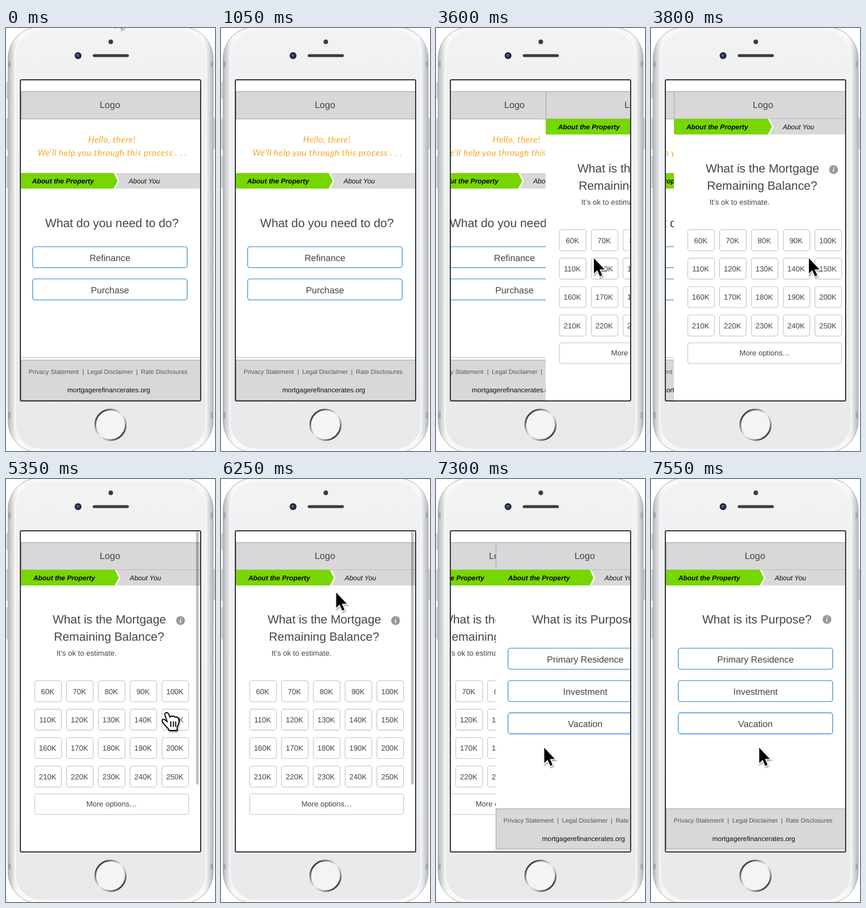
These frames come from a looping animation (364 by 735 pixels, 8000 ms). An HTML page:

```html
<!DOCTYPE html>
<html lang="en">
<head>
<meta charset="utf-8">
<title>Mortgage form prototype</title>
<style>
  html, body { margin: 0; width: 100%; height: 100%; overflow: hidden; background: #fff; }
  svg { display: block; width: 364px; height: 735px; }
  text { font-family: "Liberation Sans", Arial, sans-serif; fill: #444; text-rendering: geometricPrecision; }
  .hand-written { font: italic 400 15px Lato, sans-serif; letter-spacing: .6px; fill: #f5a623; }
  .step { font-size: 11.9px; font-style: italic; fill: #111; }
  .active { font-weight: bold; fill: #000; }
  .small { font-size: 10.75px; fill: #555; }
  .site { font-size: 11.75px; fill: #111; }
  .info { font: italic bold 12px "Liberation Serif", serif; fill: #fff; }
</style>
</head>
<body>
<svg viewBox="0 0 364 735">
  <defs>
    <clipPath id="screen"><rect x="26" y="91" width="312" height="556"/></clipPath>
    <linearGradient id="ring" x1="0" y1="0" x2="1" y2="1">
      <stop offset=".1" stop-color="#222"/><stop offset=".3" stop-color="#999"/>
      <stop offset=".5" stop-color="#eee"/><stop offset=".7" stop-color="#aaa"/>
      <stop offset=".9" stop-color="#222"/>
    </linearGradient>
    <linearGradient id="rim">
      <stop offset="0" stop-color="#b4b5b8"/><stop offset=".015" stop-color="#cfd0d3"/>
      <stop offset=".03" stop-color="#e9eaec"/><stop offset=".05" stop-color="#f8f8f9"/>
      <stop offset=".95" stop-color="#f8f8f9"/><stop offset=".97" stop-color="#e9eaec"/>
      <stop offset=".985" stop-color="#cfd0d3"/><stop offset="1" stop-color="#b4b5b8"/>
    </linearGradient>
    <linearGradient id="face" x2="0" y2="1">
      <stop offset="0" stop-color="#f1f2f4"/><stop offset="1" stop-color="#e8e9eb"/>
    </linearGradient>
    <filter id="shadow" x="-50%" y="-50%" width="200%" height="200%">
      <feDropShadow dx="1" dy="2" stdDeviation="1.2" flood-opacity=".4"/>
    </filter>
  </defs>

  <g id="phone">
    <g fill="#e2e3e5" stroke="#aeafb3">
      <rect x="1.5" y="94" width="4" height="29" rx="1"/>
      <rect x="1.5" y="157" width="4" height="54" rx="1"/>
      <rect x="1.5" y="223" width="4" height="55" rx="1"/>
      <rect x="359" y="157" width="4" height="53" rx="1"/>
    </g>
    <rect x="3.5" y="-2" width="357.5" height="740" rx="55" fill="url(#rim)" stroke="#acadb0"/>
    <path d="M4 58h4v10h-4zM356.5 58h4v10h-4zM4 668h4v10h-4zM356.5 668h4v10h-4z" fill="#a4a5a8"/>
    <rect x="16" y="4" width="332.5" height="728" rx="45" fill="url(#face)" stroke="#f8f8f9" stroke-width="2"/>
    <circle cx="182.5" cy="24" r="4" fill="#3b3b3d"/>
    <circle cx="125.5" cy="48" r="6" fill="#25262c"/>
    <circle cx="125.5" cy="48" r="3.2" fill="#26438c"/>
    <circle cx="124.5" cy="47" r="1.2" fill="#6f8fd0"/>
    <rect x="151" y="45.5" width="63" height="5" rx="2.5" fill="#3b3b3d"/>
    <circle cx="182" cy="689.5" r="26.5" fill="#f3f4f5" stroke="url(#ring)" stroke-width="3"/>
    <rect x="25" y="90" width="314" height="558" rx="2" fill="#fff"/>
  </g>

  <g clip-path="url(#screen)">
    <g id="page0"></g>
    <g id="page1"></g>
    <g id="page2"></g>
    <rect id="scrollbar" x="331" y="91" width="4.5" height="440" rx="2" fill="#000" fill-opacity=".25"/>
  </g>
  <rect x="25" y="90" width="314" height="558" rx="2" fill="none" stroke="#37383a" stroke-width="2"/>

  <g id="cursor" filter="url(#shadow)">
    <path id="arrow" d="M0 0V26.500L6 21L10.500 31.500L14.500 29.800L10 19.500H18.500Z" stroke="#fff" stroke-width="3" paint-order="stroke"/>
    <g id="hand" fill="#fff" stroke="#000" stroke-width="1.8" stroke-linecap="round" stroke-linejoin="round">
      <path d="M6 22L2 11Q.5 6.500 4 6Q7 5.500 8.500 9L10.500 14Q12 10.500 15 13Q17 10.500 20 14Q23 12.500 25 15.500Q27 19 26 24L23 31V37H9Q8 33 4 30Q0 26-3 21Q-3 16 1 18Z"/>
      <path d="M12 22v8M16.500 22v8M20.500 22v8" fill="none"/>
    </g>
  </g>
</svg>

<script>
const LOOP = 8000, STEP = 50, WIDTH = 313;
const $ = id => document.getElementById(id);

const label = (str, x, y, size, anchor = 'middle') =>
  `<text x="${x}" y="${y}" font-size="${size}" text-anchor="${anchor}">${str}</text>`;
const title = (str, x, y) => label(str, x, y, 20.8);
const styled = (str, x, y, cls, anchor = 'start') =>
  `<text x="${x}" y="${y}" class="${cls}" text-anchor="${anchor}">${str}</text>`;
const box = (x, y, w, h, stroke, fill = '#fff', r = 4) =>
  `<rect x="${x}" y="${y}" width="${w}" height="${h}" rx="${r}" fill="${fill}" stroke="${stroke}" stroke-width="1.1"/>`;
const button = (str, x, y) => box(x, y, 269, 36.5, '#1f80dc') + label(str, x + 134.5, y + 24.5, 15.8);

const header = () =>
  '<rect x="26" y="91" width="313" height="557" fill="#fff"/>' +
  box(26.5, 110.5, 313, 47.5, '#a6a6a6', '#d8d8d8', 0) + label('Logo', 181, 139, 16);

const steps = (y, tip) => `
  <rect x="26" y="${y}" width="313" height="27" fill="#d8d8d8"/>
  <path d="M26 ${y}H${tip - 7}l7 13.5l-7 13.5H26z" fill="#78d600"/>
  <path d="M${tip - 6} ${y}l7 13.5l-7 13.5" fill="none" stroke="#fff" stroke-width="2.5"/>` +
  styled('About the Property', tip - 149.5, y + 18, 'step active') +
  styled('About You', tip + 18.5, y + 18, 'step');

const footer = y =>
  box(26.5, y, 313, 70, '#a6a6a6', '#d8d8d8', 0) +
  [['Privacy Statement', 39.5], ['|', 133], ['Legal Disclaimer', 141.5], ['|', 226.5], ['Rate Disclosures', 235]]
    .map(([str, x]) => styled(str, x, y + 24, 'small')).join('') +
  styled('mortgagerefinancerates.org', 179, y + 56, 'site', 'middle');

const info = (x, y) =>
  `<circle cx="${x}" cy="${y}" r="7.7" fill="#999"/>` + styled('i', x, y + 4, 'info', 'middle');

const amounts = Array.from({ length: 20 }, (_, i) => {
  const x = 50 + 55.4 * (i % 5), y = 350.5 + 49.4 * Math.floor(i / 5);
  return box(x, y, 46.5, 36.5, '#c2c2c2') + label(`${60 + 10 * i}K`, x + 22.5, y + 23, 13);
}).join('');

$('page0').innerHTML = header() +
  styled('Hello, there!', 184.5, 199, 'hand-written', 'middle') +
  styled('We’ll help you through this process . . .', 185, 222, 'hand-written', 'middle') +
  steps(252, 195) +
  title('What do you need to do?', 184.5, 346) +
  button('Refinance', 46.5, 380) + button('Purchase', 46.5, 436) +
  '<path d="M26 572.5h313" stroke="#bbb"/>' + footer(577);

$('page1').innerHTML = header() + steps(158, 197) +
  title('What is the Mortgage', 180, 251) + title('Remaining Balance?', 179.5, 281) +
  info(304, 246) + label('It’s ok to estimate.', 88, 307, 13, 'start') +
  amounts + box(50, 547, 268, 36, '#c2c2c2') + label('More options…', 184, 569, 13);

$('page2').innerHTML = header() + steps(158, 197) +
  title('What is its Purpose?', 184.5, 251) + info(306.5, 244) +
  ['Primary Residence', 'Investment', 'Vacation'].map((str, i) => button(str, 47.5, 294 + 56.2 * i)).join('') +
  footer(573);

// Pointer path: time, x, y
const path = [
  [0, 190, -30], [550, 190, -30], [700, 124, 4], [850, 235, 11], [1000, 342, 8], [1050, 400, 0],
  [2350, 400, 440], [2400, 337, 432], [2500, 225, 335], [2600, 47, 130], [2700, 107, 46],
  [2800, 107, 46], [2900, 195, 245], [3000, 275, 400], [5300, 275, 400], [5350, 275, 400],
  [5500, 266, 436], [5650, 235, 340], [5850, 191, 220], [6050, 200, 174], [6200, 200, 174],
  [6450, 203, 290], [6750, 188.5, 467], [8000, 188.5, 467]
];
const handTimes = [[3000, 3550], [5350, 5600], [6550, 7100]];

function pointerAt(t) {
  const i = path.findIndex(p => p[0] > t);
  const [t0, x0, y0] = path[i - 1], [t1, x1, y1] = path[i];
  const k = (t - t0) / (t1 - t0);
  return [x0 + (x1 - x0) * k, y0 + (y1 - y0) * k];
}

// Critically damped spring from 0 to 1, settled at the end time
function push(t, start, end, rate) {
  if (t <= start) return 0;
  if (t >= end) return 1;
  const x = (t - start) * rate;
  return 1 - (1 + x) * Math.exp(-x);
}

const shift = (id, x, y = 0) => $(id).setAttribute('transform', `translate(${x} ${y})`);
const show = (id, on) => $(id).setAttribute('display', on ? 'inline' : 'none');

function draw(now) {
  const t = Math.floor(now % LOOP / STEP) * STEP;
  const first = push(t, 3503, 4150, .0164), second = push(t, 7150, 7550, .018);
  shift('page0', -.3 * WIDTH * first);
  shift('page1', Math.round(WIDTH * (1 - first) - .3 * WIDTH * second));
  shift('page2', Math.round(WIDTH * (1 - second)));
  show('page0', first < 1);
  show('page1', first > 0 && second < 1);
  show('page2', second > 0);
  show('scrollbar', t >= 4150 && t < 7100);

  const isHand = handTimes.some(([a, b]) => t >= a && t < b);
  show('hand', isHand);
  show('arrow', !isHand);
  shift('cursor', ...pointerAt(t));
  requestAnimationFrame(() => draw(performance.now() - begin));
}
const begin = performance.now();
draw(0);
</script>
</body>
</html>
```
